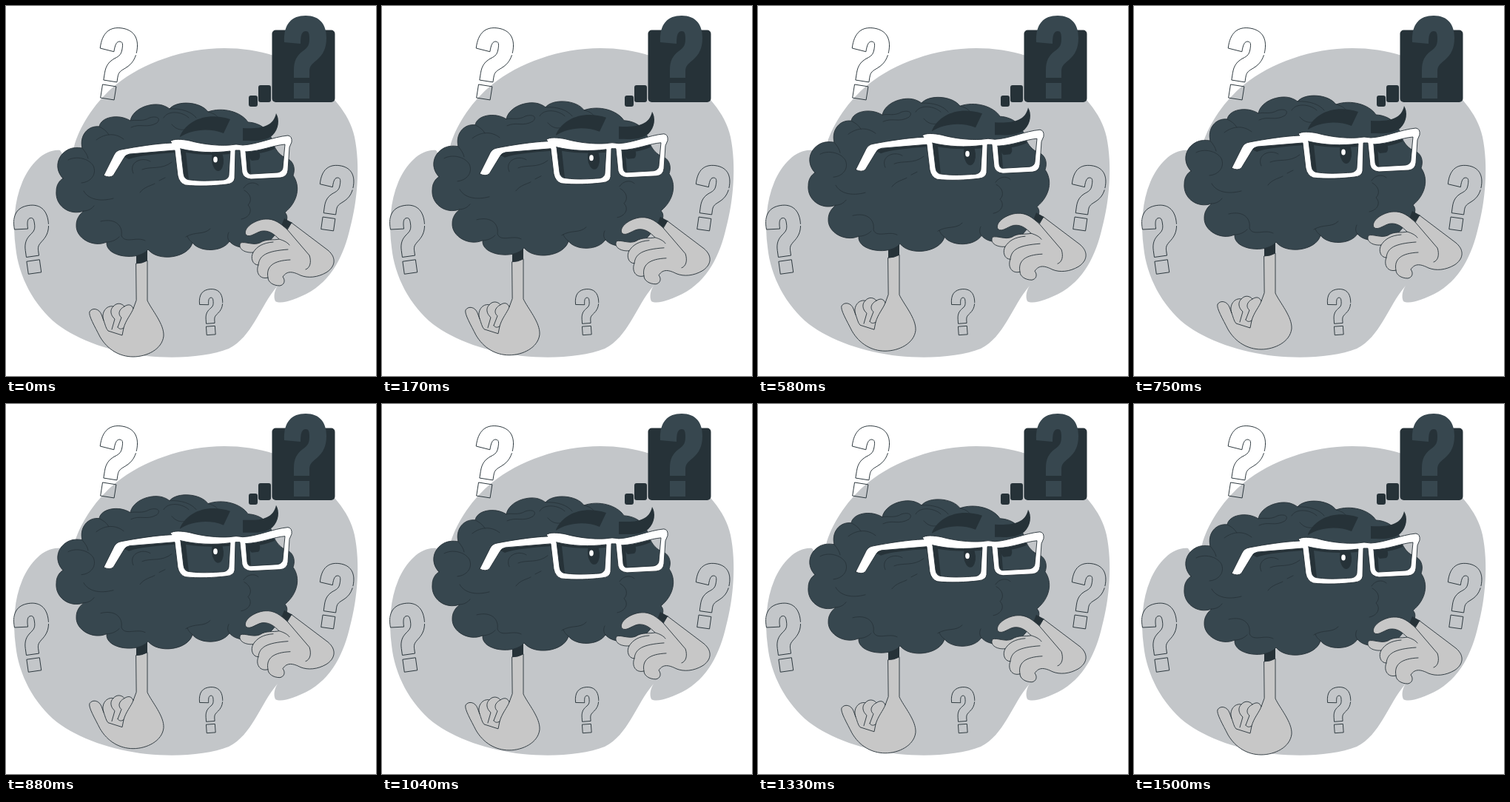
These frames come from a looping animation (500 by 500 pixels, 1.54 s). An HTML page with a canvas:

```html
<!DOCTYPE html>
<html lang="en">
<head>
<meta charset="utf-8">
<title>Thinking brain</title>
<style>
  html, body { margin: 0; width: 100%; height: 100%; overflow: hidden; background: #fff; }
  canvas { display: block; width: 100vw; height: 100vh; }
</style>
</head>
<body>
<canvas id="stage" width="500" height="500"></canvas>
<script>
const ctx = document.getElementById('stage').getContext('2d');
const DARK = '#263238', SLATE = '#37474f', BLOB = '#c3c6c9', SKIN = '#c7c7c7', WHITE = '#fff';
const LOOP = 1540, FLOAT = 1500, RISE = 10, FPS = 24;

const path = d => new Path2D(d);

const blob = path(`M73,195 C52,193 33,213 22,238 C11,264 9,296 13,326 C17,366 38,405 69,430
  C98,452 144,468 190,473 C230,477 273,474 301,463 C333,447 343,406 367,378
  C363,384 361,393 364,399 C372,404 392,396 406,389 C441,371 457,335 465,300
  C475,263 479,216 471,177 C464,143 437,119 417,99 C387,70 342,57 295,57
  C240,57 185,77 149,106 C122,128 102,158 93,186 L86,215 Z`);

const markBody = path(`M0,36 C-1,11 10,0 29,0 C48,0 57,12 57,30 C57,45 52,53 44,60
  C37,66 34,68 34,76 L34,84 L13,84 L13,73 C13,61 17,54 25,48 C32,43 34,40 34,31
  C34,24 33,21 29,21 C24,21 22,26 22,38 Z`);
const markDot = path('M13,91 H34 V112 H13 Z');

const brain = path(`M77,233 C66,222 67,203 84,194 C90,191 97,191 103,192 C99,176 110,161 126,163
  C128,150 152,145 168,155 C171,141 188,133 203,133 C211,133 217,136 221,139
  C231,127 263,129 273,143 C293,136 318,143 327,157 C346,158 357,170 360,183
  C363,192 368,201 379,206 C387,208 392,218 388,229 C398,243 395,264 377,279
  C382,284 380,292 374,297 L356,318 C336,329 312,330 302,318 C292,333 262,333 252,320
  C246,341 205,346 192,329 C180,345 134,340 136,319 C118,327 94,314 95,296
  C95,288 99,282 105,277 C86,284 66,270 68,250 C68,242 72,236 77,233 Z`);

const folds = path(`M84,208 C95,202 112,206 118,216 C123,227 115,238 102,239
  M103,192 C107,197 110,201 111,206 M105,250 C111,261 126,265 145,260 M105,277 C111,277 116,274 119,270
  M126,163 C132,166 136,169 139,174 M122,181 C135,171 149,172 159,180
  M169,164 C182,158 190,166 204,158 C210,152 204,148 194,151 C184,157 176,153 168,155
  M213,151 C219,140 239,143 247,151 M221,139 C237,138 251,143 257,151 M224,160 C229,166 235,168 241,167
  M172,226 C165,211 184,203 195,210 M184,221 C196,216 210,222 224,211
  M181,252 C187,244 196,243 201,240 M207,236 L215,232
  M128,291 C148,286 158,297 156,310 C160,322 177,311 188,317 M136,319 C143,319 149,316 153,312
  M243,312 C256,304 267,310 276,301 M252,320 C248,317 246,314 245,311
  M321,246 C326,238 336,237 341,242 M322,249 C331,254 333,263 327,269 C334,276 329,286 318,288
  M302,318 C299,315 299,310 301,306 M273,143 C282,145 286,149 288,153`);

const leftBrow = path('M235,176 C245,154 272,143 303,153 L294,172 C274,164 251,167 235,177 Z');
const rightBrow = path('M320,165 C343,166 361,164 365,145 C370,153 369,166 360,175 C349,184 333,182 320,182 Z');

const lensShade = path(`M236,193 C260,198 285,198 303,196 L303,200 C280,202 259,201 243,198
  L247,235 L240,229 Z M324,197 C345,195 355,192 362,190 L363,193 C351,198 339,200 329,200 L331,227 L325,222 Z
  M160,204 L164,201 L228,194 L229,198 C202,200 179,202 166,207 Z`);

const glasses = path(`M132,229 L146,201 Q149,195 156,194 C177,190 202,186 224,185 L222,183
  C226,179 238,180 248,182 C266,187 286,189 302,188 Q311,186 320,188 C340,187 360,177 381,175
  Q387,176 386,184 L383,191 L381,222 Q380,231 371,232 L331,234 Q321,233 319,225 L316,195 L310,195
  L309,233 Q308,240 298,241 C282,243 259,244 242,242 Q234,239 232,229 L228,195 L167,200
  Q161,201 159,206 L145,229 Q140,233 132,229 Z
  M236,193 L240,227 Q241,235 249,235 C264,237 279,236 294,235 Q300,234 301,229 L303,196 C281,199 257,198 236,193 Z
  M324,197 L326,222 Q327,228 332,227 L367,225 Q373,224 374,219 L377,187 C362,188 345,196 324,197 Z`);

const lowerCuff = path('M176,325 H191 V345 Q184,349 176,349 Z');
const lowerHand = path(`M176,348 Q184,348 191,344 L191,398 C197,411 214,430 213,446 C211,464 190,474 172,474
  C153,474 137,464 127,447 C120,433 111,418 113,413 C117,407 126,409 129,417 L132,425
  C128,414 136,404 145,406 C150,400 157,402 160,406 C166,402 170,404 172,409 L176,398 Z`);
const lowerLines = path(`M132,425 C134,430 135,436 138,439 L157,445 L159,435 C156,437 153,437 151,434
  M145,406 C140,410 141,418 147,423 L143,437 M160,406 C152,410 151,417 156,421 L151,434
  M159,435 C162,424 169,417 172,409`);

const upperCuff = path('M376,287 L387,293 L381,302 L372,297 Z');
const upperHand = path(`M386,293 L435,330 C448,341 444,353 433,360 C421,367 408,368 398,364
  C388,359 380,357 374,366 C378,371 376,377 370,378 C361,378 354,373 354,367
  C343,370 337,360 341,350 C333,350 330,340 334,333 C321,334 313,327 317,320
  C324,318 334,324 343,320 C352,314 361,317 369,315 C363,309 357,304 349,304
  C340,303 330,315 324,309 C320,300 336,289 350,288 C363,287 371,294 380,302 Z`);
const upperLines = path(`M369,315 C376,317 381,320 383,323 M334,333 C339,325 347,320 361,319
  M341,350 C342,337 352,331 381,329 M354,367 C351,352 361,344 384,343
  M380,302 L410,337 C413,346 411,354 405,356`);

function fill(shape, color, rule = 'nonzero') {
  ctx.fillStyle = color;
  ctx.fill(shape, rule);
}

function ink(shape, width = 0.9) {
  ctx.lineWidth = width;
  ctx.strokeStyle = DARK;
  ctx.stroke(shape);
}

function inked(shape, color, rule) {
  fill(shape, color, rule);
  ink(shape);
}

function roundBox(x, y, w, h, r) {
  const box = new Path2D();
  box.roundRect(x, y, w, h, r);
  fill(box, DARK);
}

function oval(x, y, rx, ry, tilt, color) {
  const shape = new Path2D();
  shape.ellipse(x, y, rx, ry, tilt, 0, Math.PI * 2);
  fill(shape, color);
}

// Each question mark is placed by the centre of its dot.
function questionMark(x, y, scale, degrees, paint) {
  ctx.save();
  ctx.translate(x, y);
  ctx.rotate(degrees * Math.PI / 180);
  ctx.scale(scale, scale);
  ctx.translate(-23.5, -101.5);
  paint(scale);
  ctx.restore();
}

// The outline has one small gap on its right side.
function outlineMark(scale) {
  ctx.setLineDash([104, 4, 400, 0]);
  ink(markBody, 0.9 / scale);
  ctx.setLineDash([]);
  ink(markDot, 0.9 / scale);
}

function solidMark() {
  fill(markBody, SLATE);
  fill(markDot, SLATE);
}

function drawScenery() {
  fill(blob, BLOB);
  questionMark(138.5, 116.5, 0.87, 9, outlineMark);
  questionMark(38, 352.5, 0.82, -8, outlineMark);
  questionMark(435.5, 294.5, 0.79, 8, outlineMark);
  questionMark(277, 438.5, 0.55, -4, outlineMark);
  roundBox(359.5, 32.5, 85, 97.5, 5);
  roundBox(341, 107, 17, 23, 3);
  roundBox(328, 121, 12, 15, 3);
  questionMark(399.5, 114.5, 1, 0, solidMark);
}

function drawFace() {
  fill(lensShade, DARK);
  oval(286, 208, 8, 15, -0.08, DARK);
  oval(283, 207.5, 2.8, 4, 0, WHITE);
  fill(path('M329,200 L342,197 Q345,204 341,208 L332,209 Q328,206 329,200 Z'), DARK);
  fill(leftBrow, DARK);
  fill(rightBrow, DARK);
  inked(glasses, WHITE, 'evenodd');
}

function drawThinker() {
  fill(lowerCuff, DARK);
  inked(lowerHand, SKIN);
  ink(lowerLines);
  inked(brain, SLATE);
  ink(folds, 0.8);
  drawFace();
  fill(upperCuff, DARK);
  inked(upperHand, SKIN);
  ink(upperLines);
}

// Steady rise and fall, stepped at the film rate, with a short rest at the bottom.
function lift(time) {
  const step = Math.floor((time % LOOP + 5) * FPS / 1000);
  const half = FLOAT / 2;
  const phase = (step * 1000 / FPS) % FLOAT;
  return RISE * (1 - Math.abs(phase - half) / half);
}

function draw(time) {
  ctx.clearRect(0, 0, 500, 500);
  drawScenery();
  ctx.save();
  ctx.translate(0, -lift(time));
  drawThinker();
  ctx.restore();
}

ctx.lineJoin = ctx.lineCap = 'round';
const start = performance.now();
function tick() {
  draw(performance.now() - start);
  requestAnimationFrame(tick);
}
tick();
</script>
</body>
</html>
```
